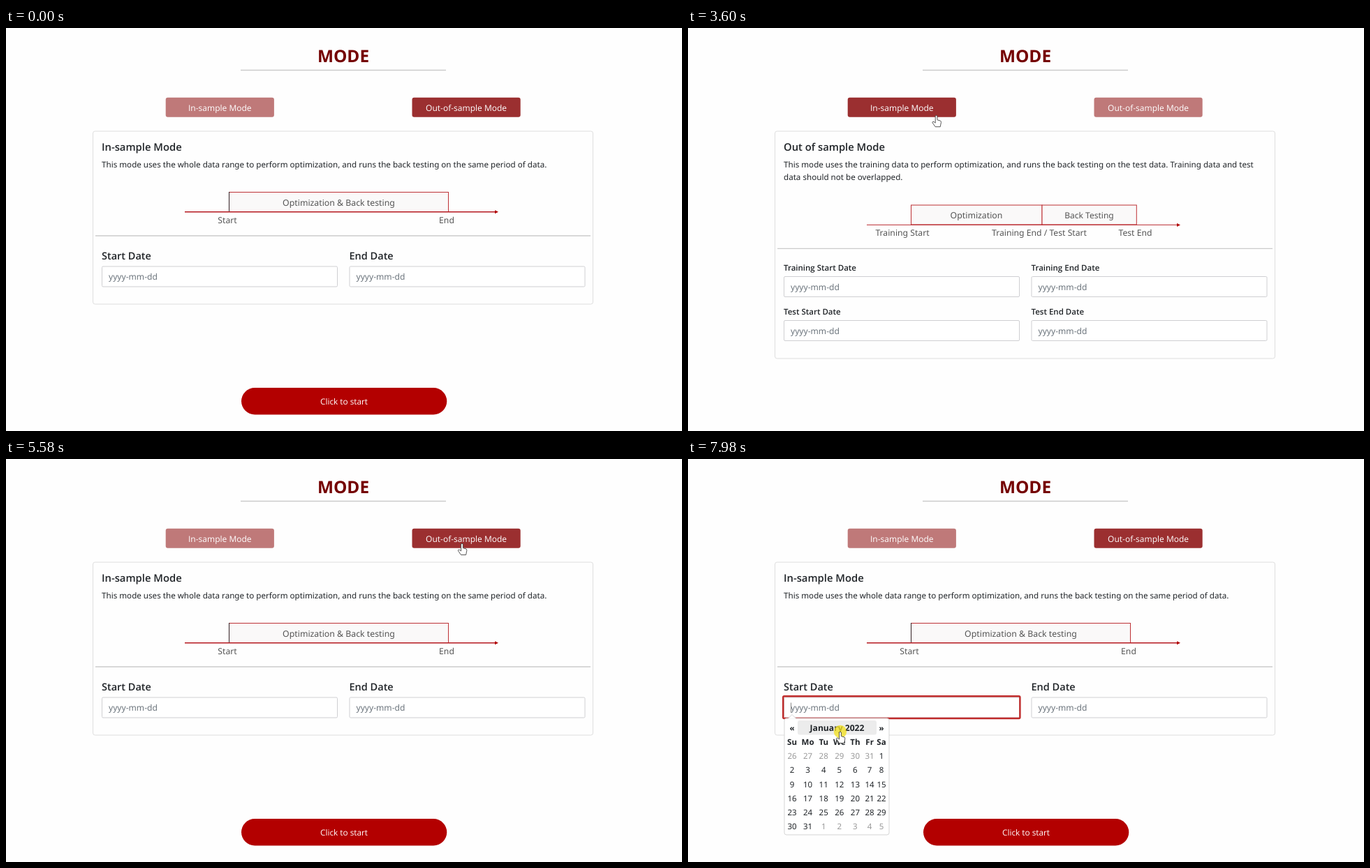
An HTML page for the animation above (8000 ms loop, 968 px wide and 578 px high).

```html
<!DOCTYPE html>
<html lang="en">
<head>
<meta charset="utf-8">
<title>Mode</title>
<style>
  html, body { margin: 0; width: 100%; height: 100%; overflow: hidden; background: #fefefe; }
  svg { display: block; width: 100%; height: 100%; }
  text { font-family: "Noto Sans", "Open Sans", sans-serif; font-size: 12.2px; fill: #555; text-rendering: geometricPrecision; }
  .label, .semi, .title, .month { font-family: "Open Sans", "Noto Sans", sans-serif; }
  .label { font-size: 12px; fill: #fff; }
  .title { font-size: 24.4px; font-weight: 700; fill: #740000; }
  .semi { font-weight: 600; fill: #212529; }
  .month { font-size: 12.15px; font-weight: 700; fill: #212529; }
  .body { font-size: 11.63px; fill: #212529; }
  .hint { font-size: 12.1px; fill: #6c757d; }
  .day { font-size: 11.5px; fill: #212529; }
  .head { font-weight: 700; }
  .other { fill: #999; }
  .mid { text-anchor: middle; }
  .card { fill: #fefefe; stroke: #dedede; }
  .field { fill: #fff; stroke: #cfcfd2; }
  .rule { stroke: #cbcbcb; stroke-width: 1.3; }
  .ring { fill: none; }
  .span { stroke: #bd3035; fill: #faf9f9; }
  .cursor { fill: #fff; stroke: #444; stroke-width: .9; }
</style>
</head>
<body>
<svg viewBox="0 0 968 578" preserveAspectRatio="none"></svg>
<script>
const svg = document.querySelector('svg');
const LOOP = 8000;
const STEP = 54; // the pointer moves in small discrete steps

const text = (x, y, cls, str, size) =>
  `<text x="${x}" y="${y}" class="${cls}"${size ? ` style="font-size:${size}px"` : ''}>${str}</text>`;
const rect = (x, y, w, h, r, attrs, id) =>
  `<rect ${id ? `id="${id}"` : ''} x="${x}" y="${y}" width="${w}" height="${h}" rx="${r}" ${attrs}/>`;
const line = (x1, y1, x2, y2, attrs) =>
  `<line x1="${x1}" y1="${y1}" x2="${x2}" y2="${y2}" ${attrs}/>`;
const axis = (y, width) =>
  line(256, y, 701, y, `stroke="#b5181f" stroke-width="${width}"`) +
  `<path d="M700 ${y - 2.5}L705 ${y}L700 ${y + 2.5}Z" fill="#b00000"/>`;
const button = (id, x, label) =>
  rect(x, 99.8, 155.2, 27.9, 3, '', id) + text(x + 77.6, 118.6, 'label mid', label) +
  rect(x - 1, 98, 157.2, 31, 4, 'class="ring" stroke="#c01c24" stroke-width="2"', id + 'Ring');

// One row of two captioned date inputs.
const dateRow = (y, size, ...captions) => captions.map((caption, i) => {
  const x = 137.5 + 354.5 * i;
  return text(x - 0.5, y - size * 0.7, 'semi', caption, size) +
    rect(x, y, 337, 29, 1.5, 'class="field"') + text(x + 9.5, y + 19, 'hint', 'yyyy-mm-dd');
}).join('');

const card = (height, title, ...lines) =>
  rect(124.5, 148, 716, height, 3, 'class="card"') + text(137, 176.2, 'semi', title, 14.8) +
  lines.map((str, i) => text(137, 199.8 + 18.6 * i, 'body', str)).join('');

const inSampleView = () =>
  card(248, 'In-sample Mode',
    'This mode uses the whole data range to perform optimization, and runs the back testing on the same period of data.') +
  rect(319.5, 235.5, 314, 28, 0, 'class="span"') +
  line(319.5, 235, 319.5, 264, 'stroke="#332024"') + axis(263.8, 1.4) +
  text(476.5, 254.6, 'mid', 'Optimization &amp; Back testing', 12.3) +
  text(317, 279.6, 'mid', 'Start') + text(631, 279.6, 'mid', 'End') +
  line(128, 298, 837, 298, 'class="rule"') +
  dateRow(342, 14.5, 'Start Date', 'End Date') +
  rect(337, 516, 294.3, 38.5, 19.25, 'fill="#b30000"') +
  text(484, 540.2, 'label mid', 'Click to start', 11.8);

const outOfSampleView = () =>
  card(326, 'Out of sample Mode',
    'This mode uses the training data to perform optimization, and runs the back testing on the test data. Training data and test',
    'data should not be overlapped.') +
  rect(319.5, 254, 187.5, 28, 0, 'class="span"') + rect(507, 254, 135.3, 28, 0, 'class="span"') + axis(282.4, 0.9) +
  text(413, 273, 'mid', 'Optimization', 12.3) + text(574.5, 273, 'mid', 'Back Testing', 12) +
  text(307, 298.2, 'mid', 'Training Start') + text(503, 298.2, 'mid', 'Training End / Test Start') +
  text(640.5, 298.2, 'mid', 'Test End') +
  line(128, 316.3, 837, 316.3, 'class="rule"') +
  dateRow(356.5, 11.5, 'Training Start Date', 'Training End Date') +
  dateRow(419.5, 11.5, 'Test Start Date', 'Test End Date');

function calendarView() {
  // Columns are evenly spaced, with the last two pulled in.
  const column = i => 149 + 22.6 * i - 1.9 * Math.max(0, i - 4) ** 2;
  let out = rect(138, 372, 150, 167, 3, 'fill="#fff" stroke="#d5d5d5"') +
    '<path d="M143 372.6L149 366.5L155 372.6" fill="#fff" stroke="#d5d5d5"/>' +
    rect(157, 375, 113, 20.5, 3, 'fill="#ececec"', 'monthHover') +
    text(213.5, 390, 'month mid', 'January 2022') +
    text(column(0), 390, 'day head mid', '«') + text(column(6), 390, 'day head mid', '»');
  'Su Mo Tu We Th Fr Sa'.split(' ').forEach((d, i) => out += text(column(i), 410.2, 'day head mid', d));
  for (let i = 0; i < 42; i++) {
    const date = new Date(2021, 11, 26 + i);
    const cls = 'day mid' + (date.getMonth() ? ' other' : '');
    out += text(column(i % 7), 430.3 + 20.1 * Math.floor(i / 7), cls, date.getDate());
  }
  return out;
}

svg.innerHTML =
  text(483, 49, 'title mid', 'MODE') + line(336, 60.5, 630, 60.5, 'class="rule"') +
  button('inBtn', 228.7, 'In-sample Mode') + button('outBtn', 581.5, 'Out-of-sample Mode') +
  `<g id="inView">${inSampleView()}</g><g id="outView">${outOfSampleView()}</g>` +
  rect(136.2, 340.2, 339.2, 31.8, 1.5, 'class="ring" stroke="#bf2a2a" stroke-width="2.4"', 'fieldRing') +
  `<g id="calendar">${calendarView()}</g>` +
  line(147.5, 349.5, 147.5, 364, 'id="caret" stroke="#888"') +
  `<g id="pointer">
    <circle id="click" r="9.2" fill="#f2e021"/>
    <path id="arrow" class="cursor" d="M0 0V13.5L3.2 10.6L5.4 15.5L7.6 14.5L5.4 9.8H9.6Z"/>
    <path id="hand" class="cursor" d="M-1.4 1Q0 -.6 1.4 1V6.6L6 8Q7 8.5 6.8 10.5L5.6 16.5H-1.5L-5.6 10.5Q-5.4 8.4 -3.5 9.3L-1.4 11Z"/>
    <path id="beam" d="M-3.5 -6.5H-1L0 -5.8L1 -6.5H3.5M0 -5.8V5.8M-3.5 6.5H-1L0 5.8L1 6.5H3.5" fill="none" stroke="#222" stroke-width="1.4"/>
  </g>`;

const el = Object.fromEntries([...svg.querySelectorAll('[id]')].map(e => [e.id, e]));
const show = (e, on) => { e.style.display = on ? '' : 'none'; };
const clamp = v => Math.max(0, Math.min(1, v));
const within = (pos, x, y, w, h) =>
  !!pos && pos[0] >= x && pos[0] <= x + w && pos[1] >= y && pos[1] <= y + h;

// Each move is an eased curve bent towards "via"; it begins where the last one ended.
const moves = [
  { start: 440, end: 700, from: [810, 560], via: [700, 400], to: [656, 338] },
  { start: 1330, end: 1850, from: [665, 169], via: [705, -42], to: [653, 121] },
  { start: 2500, end: 2750, via: [640, 190], to: [612, 208] },
  { start: 3010, end: 3200, via: [460, 160], to: [394, 159] },
  { start: 3450, end: 3600, via: [365, 130], to: [349, 121] },
  { start: 4694, end: 5090, via: [449, 77], to: [541, 113] },
  { start: 5150, end: 5400, via: [600, 121], to: [653, 121] },
  { start: 5580, end: 6220, via: [335, 510], to: [276, 357] },
  { start: 7080, end: 7700, via: [235, 395], to: [218, 391] }
];
moves.forEach((move, i) => move.from ||= moves[i - 1].to);

function pointerAt(t) {
  const move = moves.findLast(m => m.start <= t);
  if (!move) return null;
  const elapsed = Math.floor((t - move.start) / STEP + 0.02) * STEP;
  const p = clamp(elapsed / (move.end - move.start));
  const u = p * p * (3 - 2 * p), v = 1 - u;
  return move.to.map((to, k) => v * v * move.from[k] + 2 * u * v * move.via[k] + u * u * to);
}

// Paints a mode button and tells whether it can be clicked under the pointer.
function drawButton(name, x, active, pressed, pos) {
  el[name].setAttribute('fill', pressed ? '#c68989' : active ? '#bf7979' : '#9b2f30');
  show(el[name + 'Ring'], pressed);
  return !active && !pressed && within(pos, x, 100, 155, 28);
}

function draw(t) {
  const pos = pointerAt(t);
  const between = (a, b) => t >= a && t < b;

  const outMode = between(2432, 4560);
  show(el.inView, !outMode);
  show(el.outView, outMode);
  const onIn = drawButton('inBtn', 229, !outMode, between(4384, 4760), pos);
  const onOut = drawButton('outBtn', 582, outMode, between(2273, 2640), pos);

  const open = t >= 6760;
  const onMonth = open && within(pos, 157, 375, 113, 21);
  show(el.fieldRing, open);
  show(el.calendar, open);
  show(el.monthHover, onMonth);
  show(el.caret, open && !between(7290, 7780));

  show(el.pointer, pos);
  if (!pos) return;
  el.pointer.setAttribute('transform', `translate(${pos})`);
  const onField = !outMode && within(pos, 138, 342, 336, 29);
  const hand = onIn || onOut || onMonth;
  show(el.hand, hand);
  show(el.beam, onField);
  show(el.arrow, !hand && !onField);

  const sinceClick = t - [2220, 4320, 6700, 7980].findLast(c => c <= t);
  el.click.setAttribute('opacity', 0.78 * clamp((350 - sinceClick) / 150) || 0);
}

function tick(now) {
  draw(now % LOOP);
  requestAnimationFrame(tick);
}
draw(0);
requestAnimationFrame(tick);
</script>
</body>
</html>
```
